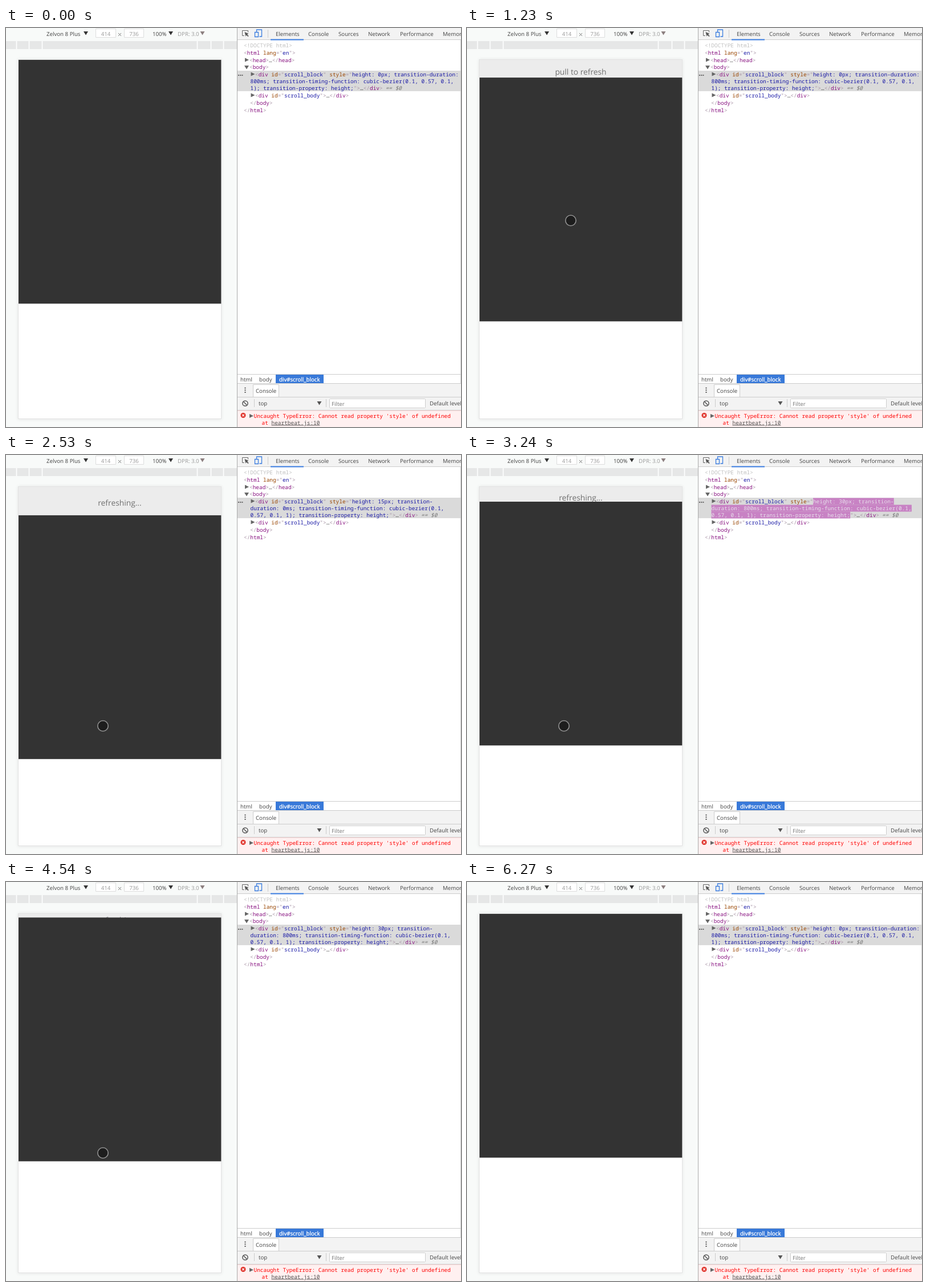
An HTML page that plays this animation: 798x701 px, repeating every 6.65 s.

```html
<!DOCTYPE html>
<html lang="en">
<head>
<meta charset="utf-8">
<title>Pull to refresh</title>
<style>
html, body { margin: 0; width: 100%; height: 100%; overflow: hidden; background: #fff; }
svg { display: block; width: 798px; height: 701px; }
text { font: 9.7px "Open Sans", sans-serif; fill: #444; white-space: pre; text-rendering: geometricPrecision; }
.mono { font: 9.444px "Noto Sans Mono", monospace; }
.hint { font-size: 13.8px; fill: #707070; text-anchor: middle; }
.mid { text-anchor: middle; }
.dim { fill: #9a9a9a; }
.p { fill: #a894a6; }
.t { fill: #881280; }
.a { fill: #994500; }
.v { fill: #1a1aa6; }
.doctype { fill: #c0c0c0; }
.note { fill: #777; font-style: italic; }
.error { fill: #f00; }
.line { stroke: #ccc; fill: none; }
</style>
</head>
<body>
<svg id="stage" viewBox="0 0 798 701">
  <defs>
    <filter id="soft" x="-10%" y="-10%" width="120%" height="120%"><feGaussianBlur stdDeviation="3"/></filter>
    <path id="down" d="M0 0h8l-4 6.500z"/>
    <path id="right" d="M0 0l7 3.500-7 3.500z"/>
  </defs>

  <!-- device pane -->
  <rect width="405" height="701" fill="#f8faf9"/>
  <rect y="23" width="405" height="14" fill="#e6e7e7"/>
  <path d="M18.500 23v14m22-14v14m23-14v14m272-14v14m24-14v14m22-14v14" stroke="#fff" stroke-width="1.600"/>
  <text x="71" y="13.500">Zelvon 8 Plus</text>
  <text x="257" y="13.500">100%</text>
  <text x="301" y="13.500" class="dim">DPR: 3.0</text>
  <use href="#down" x="136" y="6" fill="#333"/>
  <use href="#down" x="285" y="6" fill="#333"/>
  <use href="#down" x="340.500" y="6" fill="#8c7f7f"/>
  <path d="M157.500 1.500h35v15h-35zM207.500 1.500h34v15h-34z" fill="#fff" stroke="#ddd"/>
  <text x="175" y="13.500" class="mid dim">414</text>
  <text x="224.500" y="13.500" class="mid dim">736</text>
  <path d="M197 9l5 5m0-5l-5 5" stroke="#777"/>
  <rect x="21" y="55" width="357" height="633" opacity=".08" filter="url(#soft)"/>
  <rect x="21.500" y="55.500" width="356" height="631" fill="#fff" stroke="#e3e3e3"/>
  <rect id="gap" x="22" y="56" width="355" fill="#ececec"/>
  <text id="hint" x="199.500" class="hint"></text>
  <rect id="page" x="22" width="355.300" height="428.300" fill="#333"/>

  <!-- inspector pane -->
  <rect x="405" width="393" height="701" fill="#fff"/>
  <rect x="405" width="393" height="20" fill="#f3f3f3"/>
  <path d="M405 20.500h393" class="line"/>
  <path d="M464 20.500h58" stroke="#3b7de0" stroke-width="1.800"/>
  <path d="M459.500 3v14" class="line"/>
  <path d="M418 13.500h-3.500v-9h10v3" fill="none" stroke="#666"/>
  <path d="M418.500 7l7 3-2.500 1.200 2.700 2.800-1.200 1.200-2.800-2.700-1.200 2.500z" fill="#555"/>
  <path d="M439.500 7v-4h9v12h-4M436.500 7.500h6v8h-6z" fill="none" stroke="#3b7de0" stroke-width="1.300"/>
  <text x="473" y="13.500">Elements</text>
  <text x="530" y="13.500">Console</text>
  <text x="583" y="13.500">Sources</text>
  <text x="635" y="13.500">Network</text>
  <text x="691" y="13.500">Performance</text>
  <text x="766" y="13.500">Memory</text>

  <rect x="406" y="75" width="392" height="36" fill="#dadada"/>
  <g id="flash"></g>
  <g id="dom"></g>
  <g fill="#666">
    <use href="#right" x="419" y="52.500"/>
    <use href="#down" x="418" y="66"/>
    <use href="#right" x="429.500" y="77.500"/>
    <use href="#right" x="429.500" y="114.500"/>
    <use href="#right" x="427" y="678"/>
  </g>
  <path d="M407 83h9" stroke="#666" stroke-width="2" stroke-dasharray="2 1.200"/>

  <path d="M406 608.500h392M797.500 21v603" class="line"/>
  <rect x="473" y="609" width="84" height="15" fill="#3879d9"/>
  <text x="411" y="620.500">html</text>
  <text x="444" y="620.500">body</text>
  <text x="479" y="620.500" style="fill:#fff;stroke:#fff;stroke-width:.3px">div#scroll_block</text>

  <!-- console drawer -->
  <rect x="405" y="624" width="393" height="47" fill="#f3f3f3"/>
  <path d="M405 624.500h393m-393 24h393m-393 23h393" class="line"/>
  <path d="M433.500 648v-21.500h45v21.500" fill="#fff" stroke="#ccc"/>
  <path d="M419.500 631.500v10" stroke="#555" stroke-width="2" stroke-dasharray="2 1.800"/>
  <text x="438" y="640.500">Console</text>
  <g fill="none" stroke="#555" stroke-width="1.500">
    <circle cx="419.500" cy="659.500" r="4.600"/>
    <path d="M416.300 656.300l6.400 6.400"/>
  </g>
  <path d="M435.500 652v14m126-14v14" class="line"/>
  <text x="443" y="663">top</text>
  <use href="#down" x="545.500" y="656" fill="#555"/>
  <rect x="567.500" y="651.500" width="168" height="16" rx="1" fill="#fff" stroke="#ccc"/>
  <text x="571" y="663.500" style="fill:#777">Filter</text>
  <text x="743" y="663">Default levels</text>
  <rect x="405" y="672" width="393" height="29" fill="#fff0f0"/>
  <path d="M405 672.500h393" stroke="#ffd6d6"/>
  <circle cx="416" cy="680.500" r="4.500" fill="#e0342c"/>
  <path d="M414.200 678.700l3.600 3.600m0-3.600l-3.600 3.600" stroke="#fff" stroke-width="1.200"/>
  <use href="#right" x="427" y="678" fill="#666"/>
  <text x="434.500" y="684.500" class="mono error">Uncaught TypeError: Cannot read property 'style' of undefined</text>
  <text x="448.500" y="696.500" class="mono error">at</text>
  <text x="465.500" y="696.500" class="mono" style="fill:#545454;text-decoration:underline">heartbeat.js:10</text>
  <path d="M405.500 0v701" stroke="#aaa"/>

  <!-- pointers -->
  <circle id="touch" r="9.200" fill="#000" fill-opacity=".42" stroke="#929292" stroke-width="1.600"/>
  <path id="arrow" d="M.5.500v15.500l3.600-3.400 2.500 5.600 2.300-1-2.500-5.400h5z" fill="#fff" stroke="#000"/>
  <path id="beam" d="M-3-8h2l1 1 1-1h2M0-7v14M-3 8h2l1-1 1 1h2" fill="none" stroke="#333"/>
</svg>
<script>
const LOOP = 6650, CHAR = 5.667;
const $ = id => document.getElementById(id);
const set = (el, attrs) => { for (const k in attrs) el.setAttribute(k, attrs[k]); };

// syntax-coloured markup
const esc = s => s.replace(/&/g, '&amp;').replace(/</g, '&lt;').replace(/>/g, '&gt;');
const span = (cls, s) => `<tspan class="${cls}">${esc(s)}</tspan>`;
const open = (name, attrs = '') => span('p', '<') + span('t', name) + attrs + span('p', '>');
const close = name => span('p', '</') + span('t', name) + span('p', '>');
const attr = (name, value) => ' ' + span('a', name) + span('p', '="') + span('v', value) + span('p', '"');
const mono = (x, y, body) => `<text class="mono" x="${x}" y="${y}">${body}</text>`;

const live = '<tspan class="live"></tspan>';
const head = span('p', '<') + span('t', 'div') + attr('id', 'scroll_block') +
  ' ' + span('a', 'style') + span('p', '="');
const tail = span('p', '">') + '…' + close('div') + '<tspan dx="5" class="note">== $0</tspan>';
$('dom').innerHTML =
  mono(417, 33.5, span('doctype', '<!DOCTYPE html>')) +
  mono(417, 46.5, open('html', attr('lang', 'en'))) +
  mono(427, 59.5, open('head') + '…' + close('head')) +
  mono(427, 72, open('body')) +
  mono(437, 84.5, head + live) +
  mono(428.5, 96.5, live) +
  mono(428.5, 108.5, live + tail) +
  mono(437, 121.5, open('div', attr('id', 'scroll_body')) + '…' + close('div')) +
  mono(428, 134.5, close('body')) +
  mono(417, 147.5, close('html'));
$('flash').innerHTML = [607, 428.5, 428.5].map((x, i) =>
  `<rect x="${x}" y="${75.5 + 12 * i}" height="12"/>`).join('');
const lives = [...document.querySelectorAll('.live')];
const bars = [...$('flash').children];

const IDLE = ['height: 0px; transition-duration: ',
  '800ms; transition-timing-function: cubic-bezier(0.1, 0.57, 0.1, ', '1); transition-property: height;'];
const wrapped = (height, ms) => [`height: ${height}px; transition-`,
  `duration: ${ms}ms; transition-timing-function: cubic-bezier(0.1, `,
  '0.57, 0.1, 1); transition-property: height;'];

// each style change flashes, then fades between two moments
const EDITS = [
  { at: 0, fade: [-1, 0], lines: IDLE },
  { at: 1530, fade: [1900, 2530], lines: wrapped(15, 0) },
  { at: 2980, fade: [2530, 4390], lines: wrapped(30, 800) },
  { at: 4740, fade: [4950, 6270], lines: IDLE },
];
const BACK = [[158, 48, 153], [245, 219, 244], [218, 218, 218]];
const INK = [[255, 255, 255], [150, 125, 168], [26, 26, 166]];

const ramp = (t, a, b) => Math.min(1, Math.max(0, (t - a) / (b - a)));
const easeOut = (t, a, b) => 1 - (1 - ramp(t, a, b)) ** 4;
const smooth = u => u * u * (3 - 2 * u);
const mix = (a, b, k) => a.map((v, i) => v + (b[i] - v) * k);
const arc = (a, b, c, u) => mix(mix(a, b, u), mix(b, c, u), u);
const tint = ([a, b, c], p, power) =>
  `rgb(${(p < .8 ? mix(a, b, (p / .8) ** power) : mix(b, c, (p - .8) * 5)).map(Math.round)})`;

function drawStyle(t) {
  const { fade, lines } = EDITS.filter(e => e.at <= t).pop();
  const p = ramp(t, ...fade);
  lines.forEach((s, i) => {
    if (lives[i].textContent !== s) lives[i].textContent = s;
    lives[i].style.fill = tint(INK, p, 2);
    set(bars[i], { width: s.trimEnd().length * CHAR, fill: p < 1 ? tint(BACK, p, 1) : 'none' });
  });
}

// pulled down, held while refreshing, then let go in two moves
function drawPage(t) {
  const drop = 54 * ramp(t, 920, 1460) - 28 * easeOut(t, 2500, 3300)
    - 22.5 * easeOut(t, 4300, 4900) - 3.5 * easeOut(t, 5250, 5700);
  set($('gap'), { height: Math.max(0, drop) });
  set($('page'), { y: 56 + drop });
  set($('hint'), { y: 69.9 + .39 * drop });
  $('hint').textContent = t < 2350 ? 'pull to refresh' : 'refreshing...';
}

function pointer(t) {
  if (t < 841) return arc([582, 627], [320, 400], [195, 165], smooth(ramp(t, 70, 670)));
  if (t < 5200) return mix([197, 165], [170, 476], ramp(t, 841, 1541));
  return arc([170, 476], [500, 740], [721, 659], smooth(ramp(t, 5230, 5910)));
}

function drawPointer(t) {
  const [x, y] = pointer(t);
  const inField = x > 567 && x < 736 && y > 651 && y < 668;
  const kind = t < 70 || t >= 6270 ? '' : x < 378 && y < 687 ? 'touch' : inField ? 'beam' : 'arrow';
  for (const id of ['touch', 'arrow', 'beam'])
    set($(id), { visibility: id === kind ? 'visible' : 'hidden', transform: `translate(${x} ${y})` });
}

const start = performance.now();
function loop() {
  const t = (performance.now() - start) % LOOP;
  drawPage(t);
  drawStyle(t);
  drawPointer(t);
  requestAnimationFrame(loop);
}
loop();
</script>
</body>
</html>
```
